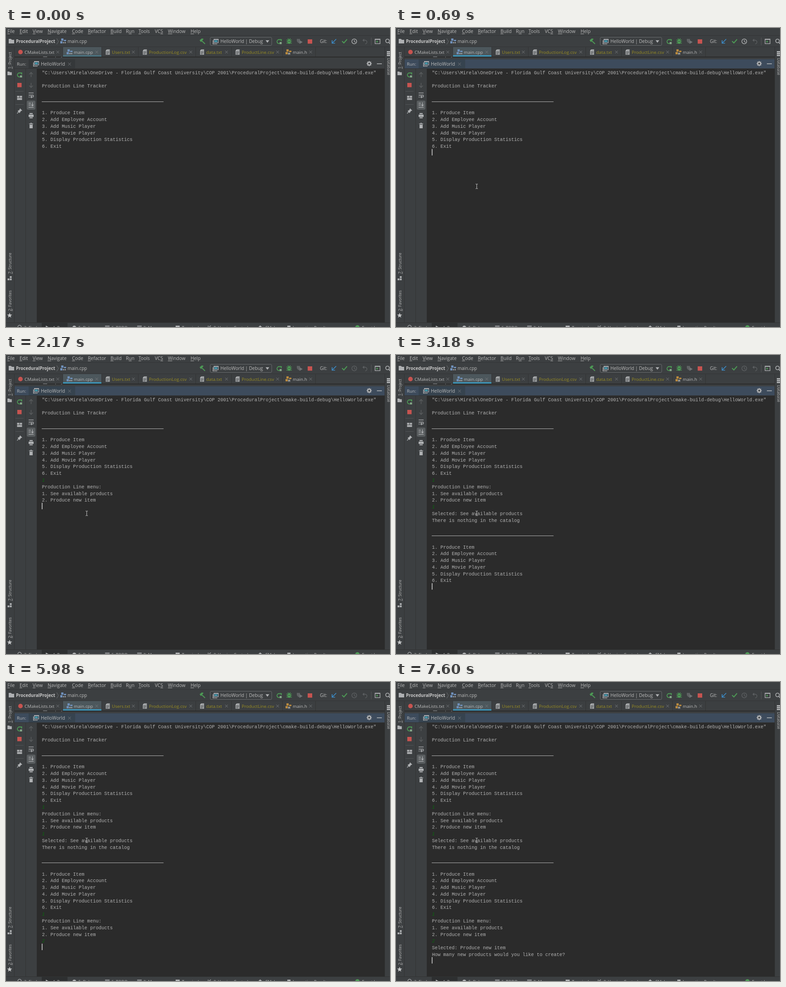
These frames come from a looping animation (849x659 px, 8000 ms). An HTML page with a canvas:

```html
<!DOCTYPE html>
<html lang="en">
<head>
<meta charset="utf-8">
<title>Production Line Tracker</title>
<style>
html, body { margin: 0; width: 100%; height: 100%; overflow: hidden; background: #3c3f41; }
canvas { display: block; }
</style>
</head>
<body>
<canvas id="stage" width="849" height="659"></canvas>
<script>
const g = document.getElementById('stage').getContext('2d');
const LOOP = 8000;
const UI = '"Open Sans", "Noto Sans", sans-serif';
const MONO = '"Liberation Mono", "Courier New", monospace';
const C = {
  bar: '#3c3f41', console: '#2b2b2b', edge: '#323334', text: '#bbbbbb', icon: '#afb1b3', print: '#b2b2b2',
  dim: '#5d6062', green: '#4d9a55', red: '#c75450', blue: '#3c8cc8', olive: '#998d22', input: '#0b6a0f'
};

// Drawing helpers
function box(color, x, y, w, h) { g.fillStyle = color; g.fillRect(x, y, w, h); }

function trace(pts) {
  g.beginPath();
  for (let i = 0; i < pts.length; i += 2) g.lineTo(pts[i], pts[i + 1]);
}
function line(color, width, ...pts) {
  trace(pts);
  g.strokeStyle = color; g.lineWidth = width; g.stroke();
}
function poly(color, ...pts) { trace(pts); g.fillStyle = color; g.fill(); }

function disc(color, x, y, r) {
  g.beginPath(); g.arc(x, y, r, 0, 7);
  g.fillStyle = color; g.fill();
}
function arc(color, width, x, y, r, from = 0, to = Math.PI * 2) {
  g.beginPath(); g.arc(x, y, r, from, to);
  g.strokeStyle = color; g.lineWidth = width; g.stroke();
}
function label(s, x, y, size = 10, color = C.text, weight = 400) {
  g.font = `${weight} ${size}px ${UI}`;
  g.fillStyle = color;
  g.fillText(s, x, y);
}
// Label with one underlined letter
function mnemonic(s, x, y, at = 0, size = 10.3) {
  label(s, x, y, size);
  const left = g.measureText(s.slice(0, at)).width;
  box(C.text, x + left, y + 1.5, g.measureText(s[at]).width, 0.9);
}
function turned(s, x, y, angle, underline) {
  g.save();
  g.translate(x, y); g.rotate(angle);
  if (underline) mnemonic(s, 0, 0, 0, 8.6); else label(s, 0, 0, 8.6);
  g.restore();
}

// Icons, placed by their centre
function cross(x, y) {
  line('#74777a', 1, x - 3, y - 3, x + 3, y + 3);
  line('#74777a', 1, x - 3, y + 3, x + 3, y - 3);
}
function folder(x, y, s = 1) {
  poly(C.icon, x - 6 * s, y - 5 * s, x - s, y - 5 * s, x + s, y - 3 * s,
    x + 6 * s, y - 3 * s, x + 6 * s, y + 5 * s, x - 6 * s, y + 5 * s);
}
function textFile(x, y) {
  poly('#9da0a2', x - 1, y - 6, x + 4.5, y - 6, x + 4.5, y + 6, x - 4.5, y + 6, x - 4.5, y - 2.5);
  poly('#c2c4c5', x - 4.5, y - 3, x - 1.7, y - 6, x - 1.7, y - 3);
  for (let i = 0; i < 3; i++) box('#4c4f51', x - 3, y - 1 + i * 2.3, i === 2 ? 4 : 6, 1);
}
function sourceFile(x, y, badge, tint) {
  box(tint, x - 5, y - 6, 5, 5);
  box(tint, x - 7, y, 5, 5);
  box(tint, x + 1, y - 3, 5, 3);
  label(badge, x - 1.5, y + 6, 6.5, '#d2d4d5', 700);
}
function appIcon(x, y) {
  box(C.icon, x - 5, y - 6, 11, 9);
  box('#41586a', x - 4, y - 4, 9, 6);
  box(C.icon, x - 7, y - 3, 1.3, 9);
  box(C.icon, x - 7, y + 4.5, 10, 1.3);
  box('#45a5b5', x - 3, y - 2.5, 6, 3);
}
function rerun(x, y) {
  arc(C.green, 1.8, x - 0.5, y, 4.3, 0.7, 5.3);
  poly(C.green, x + 1, y - 6, x + 6, y - 5, x + 5, y);
  box('#86a88a', x + 1, y + 1, 4.5, 4.5);
}
function arrow(color, x, y, dir) {
  line(color, 1.3, x, y - 5, x, y + 5);
  line(color, 1.3, x - 4, y + dir, x, y + 5 * dir, x + 4, y + dir);
}
function bug(x, y) {
  g.beginPath(); g.ellipse(x, y + 1, 3.6, 5, 0, 0, 7);
  g.fillStyle = C.green; g.fill();
  for (let i = -1; i < 2; i++) line(C.green, 1.2, x - 6, y + 1 + i * 3.5, x + 6, y + 1 + i * 3.5);
  line(C.green, 1.2, x - 3, y - 6, x, y - 3, x + 3, y - 6);
  box(C.bar, x - 2, y, 4, 1);
}
function star(x, y, r) {
  const pts = [];
  for (let i = 0; i < 10; i++) {
    const a = i * Math.PI / 5, d = i % 2 ? r * 0.42 : r;
    pts.push(x + d * Math.sin(a), y - d * Math.cos(a));
  }
  poly('#c4c6c7', ...pts);
}
function gear(x, y) {
  for (let i = 0; i < 4; i++) {
    const a = i * Math.PI / 4, dx = 5.6 * Math.cos(a), dy = 5.6 * Math.sin(a);
    line(C.icon, 2.2, x - dx, y - dy, x + dx, y + dy);
  }
  disc(C.icon, x, y, 4.2);
  disc(C.bar, x, y, 1.9);
}

// Window parts
const MENU = [['File', 3], ['Edit', 30], ['View', 59], ['Navigate', 92], ['Code', 146], ['Refactor', 181],
  ['Build', 231], ['Run', 265, 1], ['Tools', 293], ['VCS', 329, 2], ['Window', 358], ['Help', 408]];

function topBars(t) {
  MENU.forEach(([s, x, at]) => mnemonic(s, x, 11, at));
  box('#333537', 0, 16, 849, 1);

  folder(12, 29);
  label('ProceduralProject', 22, 33, 9.7, '#c8c8c8', 700);
  line('#6b6e70', 1, 112, 23, 116, 29.5, 112, 36);
  sourceFile(127, 29, '++', '#6f8fb8');
  label('main.cpp', 136, 33);

  line(C.green, 2, 432.5, 28, 440, 35);
  poly(C.green, 428, 27, 433, 23, 437, 24, 431, 31);

  g.strokeStyle = '#66696b'; g.lineWidth = 1;
  g.beginPath(); g.roundRect(451.5, 20.5, 136, 18, 2.5); g.stroke();
  appIcon(464, 30);
  label('HelloWorld | Debug', 474, 33, 10.1);
  poly(C.icon, 574, 27, 582, 27, 578, 32.5);

  rerun(604, 30);
  bug(626, 29);
  poly(C.dim, 643, 24, 650, 24, 650, 34, 646, 33, 643, 29);
  poly('#707375', 649, 27, 656, 31, 649, 35);
  box(C.red, 667, 25, 10, 9.5);

  label('Git:', 694, 33);
  line(C.blue, 1.7, 730, 24.5, 721, 33.5);
  line(C.blue, 1.7, 721, 27, 721, 33.5, 727.5, 33.5);
  line(C.green, 2.1, 743, 29, 747, 33, 754, 25);
  const clock = t < 1090 ? '#b9bbbc' : '#5f6264';
  arc(clock, 1.3, 770, 29.5, 5.4);
  line(clock, 1.2, 770, 26, 770, 30, 773, 31.5);
  arc(C.dim, 1.4, 794, 31, 4, -1.6, 1.5);
  line(C.dim, 1.4, 794, 27, 790, 27);
  poly(C.dim, 788, 27, 792, 23.5, 792, 30.5);
  box('#555759', 807, 21, 1, 17);
  g.strokeStyle = C.icon; g.lineWidth = 1.3; g.strokeRect(816, 24.5, 11, 10);
  box(C.icon, 816, 24, 11, 2);
  poly(C.green, 819, 27.5, 823, 30, 819, 32.5);
  arc(C.icon, 1.6, 843.5, 28.5, 4);
  line(C.icon, 1.8, 846.5, 31.5, 849, 35);
  box('#333537', 0, 41, 849, 1);
}

// Name, icon kind, icon x, right edge
const TABS = [['CMakeLists.txt', 'mark', 32, 125], ['main.cpp', 'cpp', 141, 211], ['Users.txt', 'txt', 225, 292],
  ['ProductionLog.csv', 'txt', 307, 419], ['data.txt', 'txt', 433.5, 498], ['ProductLine.csv', 'txt', 512, 611],
  ['main.h', 'h', 625, 684]];

function tabs(t) {
  box(C.console, 18, 63, 819, 6);
  g.save();
  g.beginPath(); g.rect(80, 63, 60, 2); g.clip();
  label('Employee', 95, 63, 9, '#8c8e90');
  g.restore();
  box('#8c8e90', 82, 63, 9, 1);
  box(C.bar, 18, 65, 819, 4);
  box('#4c575c', 125, 42, 86, 21);
  box(t < 610 ? '#4b7482' : '#3d97bb', 125, 60, 86, 3);
  for (const [name, kind, x, right] of TABS) {
    if (kind === 'mark') disc(C.red, x, 53, 5);
    else if (kind === 'txt') textFile(x, 53);
    else if (kind === 'cpp') sourceFile(x, 53, '++', '#6f8fb8');
    else sourceFile(x, 53, 'H', '#b98a3e');
    label(name, x + 9, 57, 9.8, kind === 'txt' ? C.olive : C.text);
    cross(right - 10.5, 53);
    box(C.edge, right, 42, 1, 21);
  }
}

function sideBars() {
  box(C.bar, 0, 42, 18, 617);
  box(C.edge, 18, 42, 1, 608);
  turned('1: Project', 12, 90, -Math.PI / 2, true);
  folder(8, 100, 0.8);
  turned('7: Structure', 12, 542, -Math.PI / 2, true);
  box(C.icon, 8.5, 547, 4, 4);
  box(C.icon, 3.5, 552, 4, 4);
  box(C.icon, 8.5, 552, 4, 4);
  turned('2: Favorites', 12, 624, -Math.PI / 2, true);
  star(8, 633.5, 6);

  box(C.bar, 837, 42, 12, 608);
  box(C.edge, 837, 42, 1, 608);
  for (let i = 0; i < 3; i++) box(C.icon, 842, 51 + i * 4, 7, 3);
  turned('Database', 843, 66, Math.PI / 2);
}

function runHeader(t) {
  const focused = t >= 690;
  box(focused ? '#3d4b5c' : C.bar, 18, 69, 819, 20);
  box(focused ? '#36434f' : '#35383a', 50, 69, 103, 20);
  box(C.edge, 18, 89, 819, 1);
  label('Run:', 24, 83, 9.7);
  appIcon(67, 79);
  label('HelloWorld', 77, 83, 10.3);
  cross(140.5, 79.5);
  gear(803, 78.5);
  box(C.icon, 820, 78, 11, 1.6);
}

function runTools() {
  box(C.bar, 18, 90, 50, 560);
  box(C.edge, 43, 90, 1, 560);
  rerun(30, 103.5);
  box(C.red, 25, 121, 9.5, 9.5);
  box('#515456', 21, 139, 18, 1);
  box(C.icon, 24.5, 149.5, 5, 4); box(C.icon, 30.5, 149.5, 5, 4); box(C.icon, 24.5, 154.5, 11, 4);
  box('#515456', 21, 168, 18, 1);
  line(C.icon, 1.3, 24.5, 188.5, 28, 185);
  poly(C.icon, 31, 177, 36, 182, 33, 183, 30, 187.5, 25.5, 183, 30, 180);

  arrow(C.dim, 55.5, 103, -1);
  arrow(C.dim, 55.5, 126, 1);
  box(C.icon, 50, 142.5, 11, 1.3);
  line(C.icon, 1.3, 50, 148, 60, 148, 61, 150, 60, 152, 56, 152);
  poly(C.icon, 57, 149, 57, 155, 53.5, 152);
  box(C.icon, 50, 151.5, 2.5, 1.3);

  g.fillStyle = '#5a5e60';
  g.beginPath(); g.roundRect(46, 160, 19, 20, 3); g.fill();
  box(C.icon, 50, 165, 5, 1.3); box(C.icon, 50, 169, 5, 1.3); box(C.icon, 50, 174, 11, 1.3);
  line(C.icon, 1.3, 58.5, 164, 58.5, 171);
  poly(C.icon, 55.5, 169, 61.5, 169, 58.5, 173);

  box(C.icon, 52, 187.5, 7, 2.5); box(C.icon, 50, 191, 11, 5); box(C.icon, 52, 197, 7, 2);
  box(C.icon, 51, 210.5, 9, 1.5); box(C.icon, 54, 209, 3, 1.5); box(C.icon, 52, 213, 7, 8);
}

const FOOTER = [['3: Find', 40], ['4: Run', 103], ['5: Debug', 160], ['6: TODO', 233], ['0: Messages', 304],
  ['Terminal', 389], ['9: Version Control', 459], ['CMake', 573], ['Inspection Results', 634], ['Event Log', 787]];

function footer() {
  box(C.bar, 0, 650, 849, 9);
  box(C.edge, 0, 649, 849, 1);
  box('#2d2f30', 79, 650, 57, 9);
  FOOTER.forEach(([s, x]) => label(s, x, 664, 9.2));
  arc(C.icon, 1.3, 30, 659, 3.8);
  poly(C.icon, 88, 656, 96, 660, 88, 664);
  disc(C.icon, 151, 660, 4);
  for (const x of [219, 290]) { box(C.icon, x, 656, 10, 1.2); box(C.icon, x, 658.3, 10, 1); }
  box(C.icon, 375, 656, 9, 3);
  line(C.icon, 1.2, 447, 656, 447, 659);
  line(C.icon, 1.2, 453, 656, 449, 659);
  poly(C.icon, 562, 655.5, 566, 659, 558, 659);
  box(C.icon, 622, 656, 7, 3);
  disc(C.green, 777, 660, 5);
}

// Console session
const ROW = 14.765, TOP = 89.2, LEFT = 79.4, SIZE = 10.44, CELL = SIZE * 0.6;
const RULE = '_'.repeat(43);
const ACTIONS = ['1. Produce Item', '2. Add Employee Account', '3. Add Music Player', '4. Add Movie Player',
  '5. Display Production Statistics', '6. Exit'];
const SUBMENU = ['Production Line menu:', '1. See available products', '2. Produce new item'];
const PATH = String.raw`"C:\Users\Mirela\OneDrive - Florida Gulf Coast University\COP 2001\ProceduralProject\cmake-build-debug\HelloWorld.exe"`;

// Time, first row, lines
const OUTPUT = [
  [0, 0, [PATH, '', 'Production Line Tracker', '', RULE, '', ...ACTIONS]],
  [2170, 13, SUBMENU],
  [3180, 17, ['Selected: See available products', 'There is nothing in the catalog', '', RULE, '', ...ACTIONS]],
  [5200, 29, SUBMENU],
  [6210, 33, ['Selected: Produce new item', 'How many new products would you like to create?']]
];
const INPUT = [[1770, 12, '1'], [2780, 16, '1'], [4490, 28, '1'], [5750, 32, '2']];
// Time, row (-1 hides the caret), column
const CARET = [[0, -1], [610, 12, 0], [1090, -1], [1620, 12, 0], [1770, 12, 1], [2020, 13, 0], [2170, 16, 0],
  [2780, 16, 1], [2950, 17, 0], [3180, 28, 0], [4110, -1], [4490, 28, 1], [4970, 29, 0], [5200, 32, 0],
  [5750, 32, 1], [5980, 33, 0], [6210, 35, 0], [7050, -1], [7600, 35, 0]];

function print(s, row) {
  const y = TOP + row * ROW + 12.6;
  if (s === RULE) box(C.print, 79, Math.round(y + 1.2), s.length * CELL, 1);
  else g.fillText(s, LEFT, y);
}
function session(t) {
  box(C.console, 68, 90, 769, 559);
  g.font = `${SIZE}px ${MONO}`;
  for (const [at, row, lines] of OUTPUT) {
    g.fillStyle = C.print;
    if (t >= at) lines.forEach((s, i) => print(s, row + i));
  }
  g.font = `italic ${SIZE}px ${MONO}`;
  g.fillStyle = C.input;
  for (const [at, row, s] of INPUT) if (t >= at) print(s, row);

  const [, row, col] = CARET.findLast(c => t >= c[0]);
  if (row >= 0) box('#c8c8c8', Math.round(79 + col * 5.5), TOP + row * ROW + 0.3, 1.6, 14.2);
}

function pointer(t) {
  if (t < 70) return;
  const p = Math.min(1, Math.floor((t - 70) / 78) / 6);
  const k = p * p * (3 - 2 * p);
  const x = 150 + 28.5 * k, y = 545 - 196 * k;
  if (t >= 538 && t < 690) disc('#979016', x - 1.5, y - 1, 10.5);
  line('#c3c3c3', 1, x, y - 5, x, y + 5);
  for (const d of [-5, 5]) {
    box('#c3c3c3', x - 2.5, y + d - 0.5, 2, 1);
    box('#c3c3c3', x + 0.5, y + d - 0.5, 2, 1);
  }
}

function draw(now) {
  const t = now % LOOP;
  box(C.bar, 0, 0, 849, 659);
  topBars(t);
  tabs(t);
  runHeader(t);
  runTools();
  session(t);
  sideBars();
  footer();
  pointer(t);
}

const start = performance.now();
function tick() {
  draw(performance.now() - start);
  requestAnimationFrame(tick);
}
tick();
</script>
</body>
</html>
```
